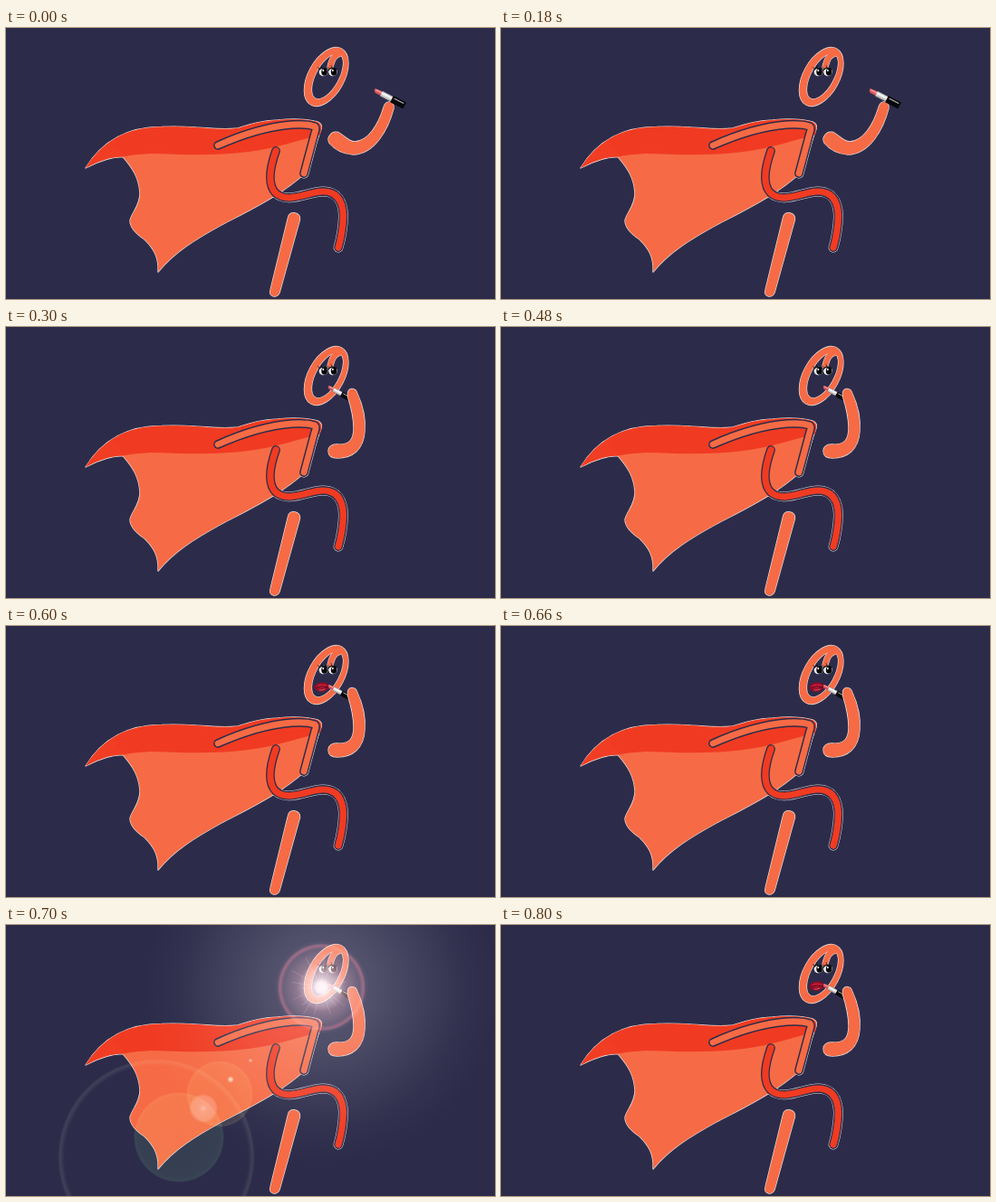
An HTML page with a canvas for the animation above (0.9 s loop, 540x300 px).

```html
<!DOCTYPE html>
<html lang="en">
<head>
<meta charset="utf-8">
<title>Caped runner with lipstick</title>
<style>
html, body { margin: 0; width: 100%; height: 100%; overflow: hidden; background: #2c2c4a; }
canvas { display: block; }
</style>
</head>
<body>
<canvas id="stage" width="540" height="300"></canvas>
<script>
const ctx = document.getElementById('stage').getContext('2d');
const NIGHT = '#2c2c4a', ORANGE = '#f66b45', RED = '#f03b22', FRINGE = 'rgba(255,245,242,.88)';
const LOOP = 900;

const capeEdge = `M88 155 C104 129 130 109.500 172 109.500 C186 109 200 109.500 208 110
  C226 111 240 113 256 111 C272 106 282 103 300 102 C318 100 333 101 344 104 `;
const cape = new Path2D(capeEdge + `Q350 107 348 112 L331 160
  C304 185 270 201 238 218 C209 234 186 248 168 270
  C169 253 163 244 153 234 C144 228 137 221 137 213 C139 204 148 197 148 183
  C147 167 141 156 129 142.500 C114 142.500 101 148 88 155 Z`);
const capeTop = new Path2D(capeEdge + `Q350 107 347 118 C325 124 299 133 268 137
  C232 142 190 140 160 139 C143 140 137 141 129 142.500 C114 142.500 101 148 88 155 Z`);
const backArm = new Path2D('M234 130 C265 116 291 109 316 107 Q333 106 341 109 Q343 111 341 116 L329 161');
const frontLeg = new Path2D('M298 136 C292 153 288 173 298 183 C312 195 334 181 350 181 C366 181 372 192 372.500 208 Q372 226 367 243');
const rearLeg = new Path2D(`M311.500 210 Q312.500 204.500 318.500 204.800 Q325 206 324.500 212
  L302 293 Q300 297.500 295.500 297 Q290.500 295.500 292 290 Z`);
const armOut = new Path2D(`M357 120 Q360 114 367 115.500 C374 120 379 126 385 126
  C400 125 411 108 417 88 Q419 81 424 82 Q429 84 428 89
  C422 112 407 140 383 140 C370 139 362 133 357 127 Q355 123 357 120 Z`);
const armUp = new Path2D(`M356 137 Q357 129.500 366 130 C380 131 384 124 384 112
  C384 98 381 88 377.500 77 Q376.500 69 382 68.500 Q386.500 68.500 388 74
  C394 87 397 103 396 115 C395 136 382 145 366 145 Q356 145 356 137 Z`);

function line(path, width, color) {
  ctx.lineWidth = width;
  ctx.strokeStyle = color;
  ctx.stroke(path);
}

function fill(path, color) {
  ctx.fillStyle = color;
  ctx.fill(path);
}

function oval(x, y, rx, ry, color, turn = 0) {
  ctx.beginPath();
  ctx.ellipse(x, y, rx, ry, turn, 0, Math.PI * 2);
  ctx.fillStyle = color;
  ctx.fill();
}

function limb(path) {
  line(path, 1.4, FRINGE);
  fill(path, ORANGE);
}

function drawBody() {
  line(frontLeg, 10.8, FRINGE);
  line(backArm, 10.8, FRINGE);
  line(cape, 1.4, FRINGE);
  fill(cape, ORANGE);
  fill(capeTop, RED);
  ctx.save();
  ctx.clip(capeTop);
  fill(new Path2D('M88 155 L118 112 Q119 132 132 142 Z'), 'rgba(249,75,45,.15)');
  ctx.restore();
  line(backArm, 9.8, NIGHT);
  line(backArm, 6.8, ORANGE);
  line(frontLeg, 9.8, NIGHT);
  line(frontLeg, 7.2, RED);
  limb(rearLeg);
}

function drawEye(x, y) {
  oval(x, y, 4.8, 4.8, '#f5f3f2', 0.2);
  oval(x + 1.1, y + 0.2, 3.3, 4.1, '#08080c');
  oval(x - 0.2, y - 1.4, 1, 1.1, '#fff');
  line(new Path2D(`M${x - 5} ${y - 2} Q${x - 1} ${y - 6} ${x + 4} ${y - 3}`), 1.2, '#101016');
  line(new Path2D(`M${x - 4} ${y - 3} l-2 -2 M${x - 1} ${y - 4} l-1 -3`), 0.7, '#101016');
}

function drawHead() {
  const ring = new Path2D();
  ring.ellipse(353.7, 54, 35.3, 19.8, -1.07, 0, Math.PI * 2);
  ring.closePath();
  ring.moveTo(355 + 28 * Math.cos(1.07), 53.5 - 28 * Math.sin(1.07));
  ring.ellipse(355, 53.5, 28, 13, -1.07, 0, Math.PI * 2);
  const lock = new Path2D('M369 28 C362 30 360 35 358 43');
  line(ring, 1.4, FRINGE);
  line(lock, 7.2, FRINGE);
  ctx.fillStyle = ORANGE;
  ctx.fill(ring, 'evenodd');
  line(lock, 6, ORANGE);
  drawEye(350.5, 48.5);
  drawEye(361, 48.5);
}

function drawLipstick(x, y, turn, size) {
  ctx.save();
  ctx.translate(x, y);
  ctx.rotate(turn);
  ctx.scale(size, size);
  fill(new Path2D('M0 -1.500 Q2 -3 10 -2.500 L10 2.500 L3 2.500 Q0 1 0 -1.500 Z'), '#d9545a');
  fill(new Path2D('M1 -1.600 L9 -1.800 L9 -.3 L2 -.3 Z'), '#f1a29d');
  const metal = ctx.createLinearGradient(0, -4, 0, 4);
  metal.addColorStop(0, '#777780');
  metal.addColorStop(0.35, '#ffffff');
  metal.addColorStop(0.7, '#c8c6c5');
  metal.addColorStop(1, '#66646a');
  ctx.fillStyle = metal;
  ctx.fillRect(9, -3.2, 14, 6.4);
  ctx.fillStyle = '#09090c';
  ctx.fillRect(22, -4, 16, 8);
  ctx.fillStyle = '#b5b3b7';
  ctx.fillRect(24, -2.4, 12, 1.2);
  ctx.restore();
}

function drawLips() {
  fill(new Path2D('M340 68 Q343 62 348 62.500 Q350 62 352 62.500 Q357 63.500 357.500 67 Q354 73 348 73 Q342 72.500 340 68 Z'), '#8d0d27');
  fill(new Path2D('M342 68 Q345 63.500 349 64.500 Q353 63.500 355.500 67 Q351 69 347 69 Z'), '#c31d39');
  line(new Path2D('M343 68 Q348 66 355 67.500'), 1, '#4d0818');
  line(new Path2D('M346 71 Q349 71.500 352 70'), 1, '#d85d70');
}

// Radial light; stops alternate between position and opacity.
function glow(x, y, r, rgb, ...stops) {
  const g = ctx.createRadialGradient(x, y, 0, x, y, r);
  for (let i = 0; i < stops.length; i += 2) {
    g.addColorStop(stops[i], `rgba(${rgb},${stops[i + 1]})`);
  }
  oval(x, y, r, r, g);
}

function drawFlare() {
  const x = 348.5, y = 69;
  ctx.save();
  ctx.globalCompositeOperation = 'screen';
  glow(x, y, 195, '145,140,148', 0, 0.4, 0.3, 0.31, 0.55, 0.18, 0.8, 0.05, 1, 0);
  glow(x, y, 52, '235,150,165', 0, 0.7, 0.4, 0.46, 0.75, 0.2, 1, 0);
  glow(x, y, 49, '220,65,75', 0, 0, 0.86, 0, 0.94, 0.45, 1, 0);
  glow(x, y, 27, '255,235,238', 0, 1, 0.22, 0.95, 0.4, 0.5, 1, 0);

  ctx.translate(x, y);
  for (let i = 0; i < 18; i++) {
    const a = i * 2.399, reach = 22 + (i * 7) % 17;
    const ray = new Path2D(`M0 0 L${Math.cos(a) * reach} ${Math.sin(a) * reach}`);
    line(ray, 0.8, 'rgba(255,225,230,.2)');
  }
  ctx.translate(-x, -y);

  glow(166, 257, 109, '125,105,90', 0, 0, 0.93, 0, 0.975, 0.22, 1, 0);
  glow(191, 235, 50, '65,125,65', 0, 0.16, 0.9, 0.2, 0.97, 0.25, 1, 0);
  glow(236, 187, 37, '175,145,65', 0, 0.12, 0.88, 0.16, 0.95, 0.22, 1, 0);
  glow(218, 203, 16, '255,130,145', 0, 0.85, 0.25, 0.48, 0.85, 0.34, 1, 0);
  glow(248, 171, 4, '255,215,195', 0, 1, 0.4, 0.6, 1, 0);
  glow(270, 150, 2.5, '255,190,185', 0, 0.8, 1, 0);
  ctx.restore();
}

function draw(ms) {
  const raised = ms >= 300, painted = ms >= 600, flash = ms >= 700 && ms < 800;
  ctx.fillStyle = NIGHT;
  ctx.fillRect(0, 0, 540, 300);
  ctx.lineCap = ctx.lineJoin = 'round';
  drawBody();
  drawHead();
  if (painted) drawLips();
  if (raised) {
    drawLipstick(355.5, 66, 0.5, 0.77);
    limb(armUp);
  } else {
    limb(armOut);
    drawLipstick(406.5, 68.5, 0.48, 1);
  }
  if (flash) drawFlare();
}

const start = performance.now();
function tick() {
  draw((performance.now() - start) % LOOP);
  requestAnimationFrame(tick);
}
tick();
</script>
</body>
</html>
```
